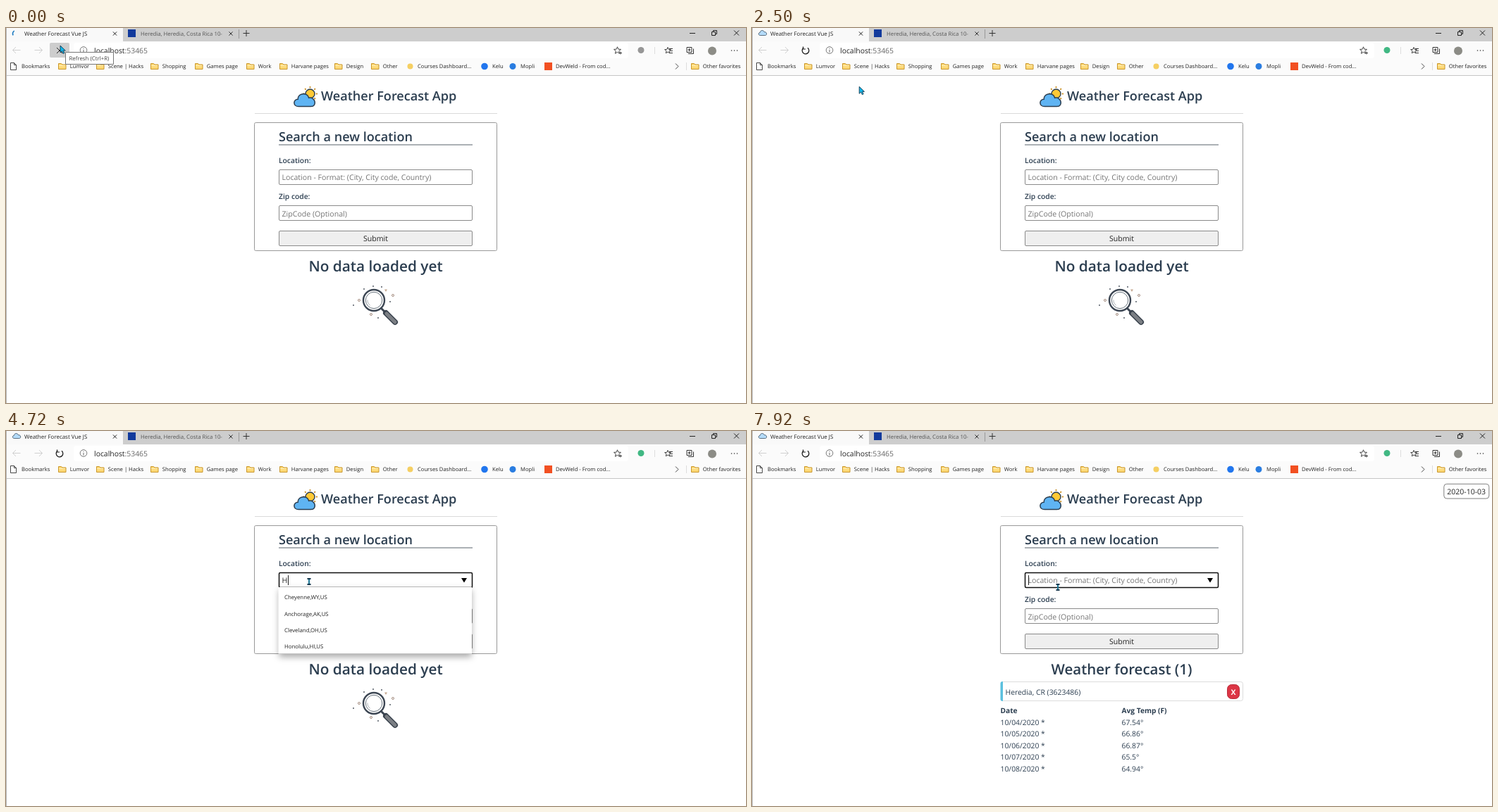
An HTML page with a canvas that plays this animation: 1050x533 px, repeating every 8000 ms.

```html
<!DOCTYPE html>
<html lang="en">
<head>
<meta charset="utf-8">
<title>Weather Forecast</title>
<style>
  html, body { margin: 0; width: 100%; height: 100%; overflow: hidden; background: #fff; }
  canvas { display: block; width: 1050px; height: 533px; }
</style>
</head>
<body>
<canvas id="stage" width="1050" height="533"></canvas>
<script>
const ctx = document.getElementById('stage').getContext('2d');
ctx.textRendering = 'geometricPrecision'; // fractional sizes without hinting
const LOOP = 8000;
const INK = '#2c3e50';
const FONT = '"Open Sans", "Noto Sans", sans-serif';
const FIELD = 10.6, CHROME = 7.65;

// Event times in ms
const T = {
  tipOff: 280, blank: 540, loaded: 1490, stopOff: 1620, vueOn: 2000,
  focus: 3310, typing: 4570, letter: 158, lastLetter: 5510, result: 6570
};
const CITIES = ['Marlboro,MA', 'San Diego,CA', 'Cheyenne,WY', 'Anchorage,AK', 'Austin,TX',
  'Orlando,FL', 'Seattle,WA', 'Cleveland,OH', 'Portland,ME', 'Honolulu,HI'].map(c => c + ',US');
const TEMPS = ['67.54', '66.86', '66.87', '65.5', '64.94'];
const FOLDERS = [[74, 'Lumvor'], [128, 'Scene | Hacks'], [205, 'Shopping'], [268, 'Games page'],
  [341, 'Work'], [388, 'Harvane pages'], [466, 'Design'], [518, 'Other'], [972, 'Other favorites']];
const ARROW_PATH = [[0, 77, 25], [800, 80, 31], [1710, 81, 36], [1850, 81, 37], [2230, 82, 49], [3140, 436, 222]];
const BEAM_STOPS = [[3310, 431, 215], [3580, 430, 214], [7370, 428, 214],
  [7650, 429, 215], [7790, 432, 219], [7920, 434, 222]];

function text(s, x, y, size, { color = INK, weight = 400, align = 'left' } = {}) {
  ctx.font = `${weight} ${size}px ${FONT}`;
  ctx.fillStyle = color;
  ctx.textAlign = align;
  ctx.fillText(s, x, y);
}

function rect(x, y, w, h, color) {
  ctx.fillStyle = color;
  ctx.fillRect(x, y, w, h);
}

function box(x, y, w, h, r, fill, stroke, lw = 1) {
  ctx.beginPath();
  ctx.roundRect(x, y, w, h, r);
  paint(fill, stroke, lw);
}

function disc(x, y, r, fill, stroke, lw = 1) {
  ctx.beginPath();
  ctx.arc(x, y, r, 0, 7);
  paint(fill, stroke, lw);
}

function paint(fill, stroke, lw = 1) {
  if (fill) { ctx.fillStyle = fill; ctx.fill(); }
  if (stroke) { ctx.strokeStyle = stroke; ctx.lineWidth = lw; ctx.stroke(); }
}

function shape(d, x, y, fill, stroke, lw = 1) {
  const p = new Path2D(d);
  ctx.save();
  ctx.translate(x, y);
  if (fill) { ctx.fillStyle = fill; ctx.fill(p); }
  if (stroke) { ctx.strokeStyle = stroke; ctx.lineWidth = lw; ctx.stroke(p); }
  ctx.restore();
}

const cross = (x, y, r, color) =>
  shape(`M${-r} ${-r}L${r} ${r}M${r} ${-r}L${-r} ${r}`, x, y, null, color);

function star(x, y, r) {
  ctx.beginPath();
  for (let i = 0; i < 10; i++) {
    const a = i * Math.PI / 5 - Math.PI / 2, q = i % 2 ? r * 0.45 : r;
    ctx.lineTo(x + q * Math.cos(a), y + q * Math.sin(a));
  }
  ctx.closePath();
  paint(null, '#333', 0.9);
}

function folder(x) {
  shape('M.5 1.5h4l1.5 1.5h5v6.5h-10.5z', x, 49, '#ffd976', '#c8962c');
  rect(x + 1, 53, 9, 1, '#fff0bd');
}

function cloud(x, y, s, fill, lw) {
  ctx.save();
  ctx.translate(x, y);
  ctx.scale(s, s);
  shape('M7 20C-1 20-1 10 6 10C6 1 19 0 21 8C30 6 33 20 24 20Z', 0, 0, fill, INK, lw);
  ctx.restore();
}

function arrowAt(t) {
  const q = t < 150 ? 0 : 150 + Math.floor((t - 150) / 130) * 130;
  const i = ARROW_PATH.findIndex(k => k[0] > q);
  if (i < 0) return ARROW_PATH.at(-1).slice(1);
  const [t0, x0, y0] = ARROW_PATH[i - 1], [t1, x1, y1] = ARROW_PATH[i];
  const u = (q - t0) / (t1 - t0), e = u * u * (3 - 2 * u);
  return [x0 + (x1 - x0) * e, y0 + (y1 - y0) * e];
}

function typedAt(t) {
  if (t < T.typing || t >= T.result) return '';
  const n = t >= T.lastLetter ? 7 : Math.min(6, 1 + Math.floor((t - T.typing) / T.letter));
  return 'Heredia'.slice(0, n);
}

function caretOn(t) {
  if (t < T.focus) return false;
  if (t < T.typing) return t < 3860 || t >= 4420;
  if (t < T.lastLetter) return true;
  if (t < T.result) return t >= 5790 && t < 6070;
  return t < 7090 || t >= 7650;
}

function drawTabs(t) {
  rect(0, 0, 1050, 19, '#cdcdcd');
  rect(0, 0, 166, 19, '#f9f9f9');
  if (t < T.loaded) {
    const a = 2.6 + Math.floor(t / 130) * 1.15;
    ctx.beginPath();
    ctx.arc(14, 8, 4.5, a, a + 1.6);
    paint(null, '#1878c0', 1.6);
  } else {
    cloud(9, 2.5, 0.4, '#b5dcfa', 1.8);
  }
  text('Weather Forecast Vue JS', 26, 10.5, 7.95, { color: '#222' });
  cross(154.5, 8, 2.6, '#222');
  rect(173, 2, 11, 11, '#123a9c');
  ctx.save();
  ctx.beginPath();
  ctx.rect(190, 0, 118, 19);
  ctx.clip();
  text('Heredia, Heredia, Costa Rica 10-', 191, 10.5, 7.8, { color: '#555' });
  ctx.restore();
  cross(319, 8, 2.6, '#333');
  rect(330, 2, 1, 13, '#999');
  shape('M-4.5 0H4.5M0-4.5V4.5', 341, 7.5, null, '#333');
  rect(970, 7, 8, 1, '#222');
  shape('M-3.5-1.5h5v5h-5zM-1.5-1.5v-2h5v5h-2', 1005, 7, null, '#222');
  cross(1036.5, 7, 3.5, '#222');
}

function drawToolbar(t, hover) {
  rect(0, 19, 1050, 48, '#fbfbfb');
  box(96, 21, 787, 22, 3, '#fff');
  shape('M5.5 0H-5.5M-1-4.5L-5.5 0L-1 4.5', 15, 31.5, null, '#d0d0d0');
  shape('M-5.5 0H5.5M1-4.5L5.5 0L1 4.5', 46, 31.5, null, '#d0d0d0');
  if (hover) box(62, 21, 28, 21, 2, '#cdcdcd');
  if (t < T.stopOff) {
    cross(76, 32, 4, '#222');
  } else if (!hover) {
    ctx.beginPath();
    ctx.arc(76, 32, 4.8, -0.9, 4.1);
    paint(null, '#222', 1.3);
    shape('M0 0V3.5H3.5', 72.5, 26.5, null, '#222', 1.2);
  }
  disc(110, 31.5, 4.8, null, '#666', 0.9);
  rect(109.5, 31, 1, 3.5, '#666');
  rect(109.5, 28.8, 1, 1, '#666');
  text('localhost', 125, 35.5, 10.4, { color: '#222' });
  text(':53465', 125 + ctx.measureText('localhost').width, 35.5, 10.4, { color: '#666' });

  star(867.5, 32, 5.2);
  shape('M0 0h4M2-2v4', 870, 35.5, null, '#333', 0.9);
  disc(901, 31.5, 4.5, t < T.vueOn ? '#969696' : '#41b883');
  rect(920, 27, 1, 10, '#ddd');
  star(939, 32, 4.6);
  shape('M0 0h5M1 3h4M0 6h5', 941, 29.5, null, '#333');
  shape('M-5-4.5h7v7h-7zM-3 4.5h7.5v-7M-3.5-1h4M-1.5-3v4', 971, 32, null, '#333');
  disc(1002, 32.5, 6, '#8c8c86');
  for (const x of [1029.5, 1033.5, 1037.5]) disc(x, 32, 0.8, '#333');
}

function drawBookmarks() {
  const label = (s, x) => text(s, x, 57, CHROME, { color: '#222' });
  shape('M.5.5h5l3 3v7h-8zM5.5.5v3h3', 6, 49, '#fff', '#333', 0.9);
  label('Bookmarks', 22);
  for (const [x, name] of FOLDERS) {
    folder(x);
    label(name, x + 16.8);
  }
  disc(573.5, 54.5, 4, '#f5cf62');
  label('Courses Dashboard...', 584);
  disc(679, 54.5, 4.8, '#2176ee');
  label('Kelu', 690);
  disc(719, 54.5, 4.5, '#2a7de1');
  label('Mopli', 730);
  rect(764, 49, 11, 11, '#f25022');
  label('DevWeld - From cod...', 780);
  shape('M-2-4L2 0L-2 4', 952, 54.5, null, '#444');
  rect(965, 49, 1, 11, '#ddd');
  rect(0, 67, 1050, 1, '#c6c6c6');
  rect(0, 0, 1, 533, '#b4b4b4');
}

function drawLens() {
  ctx.lineCap = 'round';
  shape('M11 12L17 18', 522, 387, null, '#3c4653', 3);
  shape('M17 18L30 31', 522, 387, null, '#39424d', 8);
  shape('M18 19L30 31', 522, 387, null, '#7b7f84', 5);
  ctx.lineCap = 'butt';
  disc(522, 387, 15, '#fff', '#3c4653', 2.4);
  disc(522, 387, 11.7, null, '#596570', 0.9);
  ctx.beginPath();
  ctx.arc(522, 387, 9, 2.2, 3.2);
  paint(null, '#aab0b5', 1);
  for (const [x, y] of [[508, 371], [521, 367], [533, 368], [493, 394], [545, 389], [528, 412]])
    disc(x, y, 1, '#555d66');
  for (const [x, y] of [[501, 387], [518, 407], [549, 380]]) disc(x, y, 1.5, null, '#a58d7f', 1);
  shape('M-2-1.5h4l-2 3.5z', 539, 373, '#c5a891');
}

function drawResult() {
  text('Weather forecast (1)', 524.5, 346, 20.5, { weight: 600, align: 'center' });
  box(353.5, 356.5, 343, 27, 3, '#fff', '#dcdcdc');
  box(352.5, 356, 3.5, 28, [3, 0, 0, 3], '#5bc0de');
  text('Heredia, CR (3623486)', 359.5, 374.5, 10.4);
  box(674.5, 360.5, 17, 20, 6, '#dc3545', '#b92c3a');
  text('X', 683, 374.5, 10.5, { color: '#fff', weight: 700, align: 'center' });
  text('Date', 352.5, 401, 10.2, { weight: 700 });
  text('Avg Temp (F)', 524.5, 401, 10.2, { weight: 700 });
  TEMPS.forEach((deg, i) => {
    const y = 417.5 + i * 16.5;
    text(`10/0${4 + i}/2020 *`, 352.5, y, 10.35);
    text(deg + '°', 524.5, y, 10.35);
  });
  box(981.8, 75.3, 64, 20.7, 4, '#fff', '#808080');
  text('2020-10-03', 1013.7, 89.7, 10.5, { color: '#222', align: 'center' });
}

function drawList(query) {
  const rows = CITIES.filter(c => c.toLowerCase().includes(query.toLowerCase()));
  if (!rows.length) return;
  const full = rows.length === CITIES.length;
  const h = full ? 234 : rows.length * 23.4 + 1;
  ctx.save();
  ctx.shadowColor = 'rgba(0,0,0,.35)';
  ctx.shadowBlur = 9;
  ctx.shadowOffsetY = 4;
  rect(386.5, 222, 274.5, h, '#fff');
  ctx.restore();
  rows.forEach((c, i) => text(c, 395, 239.3 + i * 23.35, 7.85, { color: '#222' }));
  if (!full) return;
  rect(651, 222, 10, 234, '#f4f4f4');
  box(652, 235, 7.5, 203, 3, '#bdbdbd');
  shape('M-2.5 1.5L0-1L2.5 1.5', 656, 227, null, '#555');
  shape('M-2.5-1L0 1.5L2.5-1', 656, 450, null, '#555');
}

function drawLogo() {
  disc(431.5, 93.5, 6.5, '#ffc935', INK, 1.4);
  for (let i = 0; i < 8; i++) {
    const a = i * Math.PI / 4, c = Math.cos(a), s = Math.sin(a);
    shape(`M${8.4 * c} ${8.4 * s}L${10.4 * c} ${10.4 * s}`, 431.5, 93.5, null, '#c88a16', 1.8);
  }
  cloud(408, 91, 1.03, '#5fb4f3', 1.5);
}

function drawPage(t) {
  const focused = t >= T.focus, query = typedAt(t);
  const hint = { color: '#757575' };

  drawLogo();
  text('Weather Forecast App', 447, 103, 18.1, { weight: 600 });
  rect(353, 121, 344, 1, '#dadada');

  box(352.5, 134.5, 344, 182, 2, null, '#999');
  text('Search a new location', 387, 161, 18.1, { weight: 600 });
  rect(387, 165.5, 275, 1, '#59636d');
  text('Location:', 387, 191.5, 10.3, { weight: 600 });
  text('Zip code:', 387, 242.5, 10.3, { weight: 600 });
  box(387.5, 201.5, 274, 21, 1.5, '#fff', focused ? '#101010' : '#8a8a8a', focused ? 1.5 : 1);
  if (query) text(query, 391.5, 216, FIELD, { color: '#222' });
  else text('Location - Format: (City, City code, Country)', 391.5, 216, FIELD, hint);
  if (focused) shape('M-4-3H4L0 3.5Z', 650, 212, '#000');
  if (caretOn(t)) {
    ctx.font = `400 ${FIELD}px ${FONT}`;
    rect(Math.round(391.7 + ctx.measureText(query).width), 205, 1, 14, '#222');
  }
  box(387.5, 252.5, 274, 21, 1.5, '#fff', '#8a8a8a');
  text('ZipCode (Optional)', 391.5, 267.5, FIELD, hint);
  box(387.5, 288.5, 274, 21, 1.5, '#efefef', '#8a8a8a');
  text('Submit', 524.5, 303, FIELD, { color: '#222', align: 'center' });

  if (t >= T.result) {
    drawResult();
  } else {
    text('No data loaded yet', 524.5, 346, 20.8, { weight: 600, align: 'center' });
    drawLens();
  }
  if (focused && t < T.lastLetter) drawList(query);
}

function drawPointer(t, [x, y]) {
  if (t < T.focus) {
    shape('M0 0V10L2.4 7.8L4.2 11.4L6 10.5L4.3 7.1H7.3Z', x, y, '#12b5e8', '#17394f', 0.9);
    return;
  }
  const [, bx, by] = BEAM_STOPS.findLast(k => k[0] <= t);
  shape('M-2.5-4H2.5M0-4V4M-2.5 4H2.5', bx, by, null, '#17394f', 2);
  shape('M0-3V3', bx, by, null, '#22b4dc', 1);
}

function draw(t) {
  rect(0, 0, 1050, 533, '#fff');
  const arrow = arrowAt(t), hover = arrow[1] < 42;
  drawTabs(t);
  drawToolbar(t, hover);
  drawBookmarks();
  if (t < T.blank || t >= T.loaded) drawPage(t);
  if (t < T.tipOff) {
    box(84.5, 34.5, 68, 17, 0, '#fff', '#777');
    text('Refresh (Ctrl+R)', 89.5, 46, 7.85, { color: '#444' });
  }
  drawPointer(t, arrow);
}

const start = performance.now();
function tick() {
  draw((performance.now() - start) % LOOP);
  requestAnimationFrame(tick);
}
tick();
</script>
</body>
</html>
```
